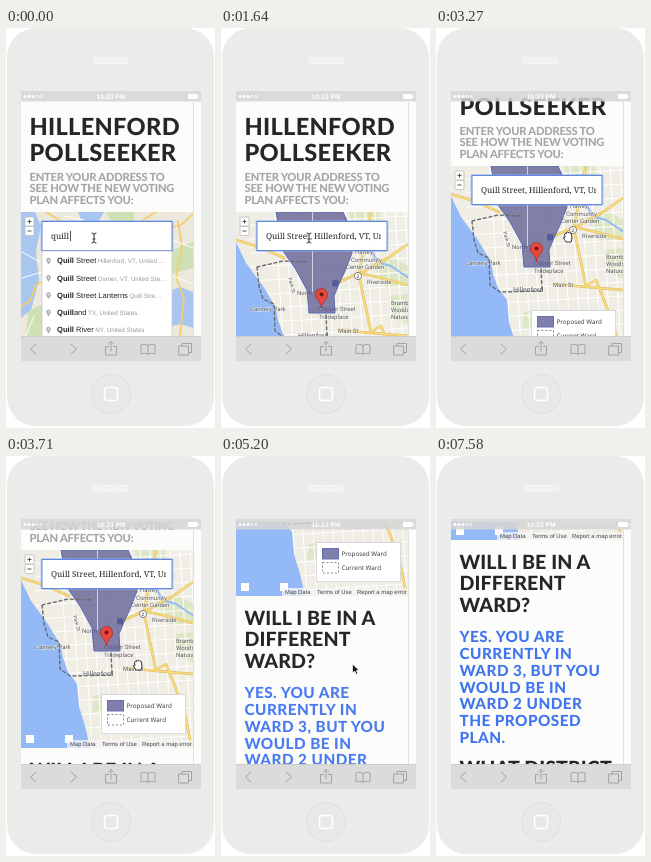
These frames come from a looping animation (209x400 px, 7810 ms). An HTML page:

```html
<!DOCTYPE html>
<html lang="en">
<head>
<meta charset="utf-8">
<title>Ward lookup on a phone</title>
<style>
html, body { margin: 0; width: 100%; height: 100%; overflow: hidden; background: #fff; }
svg { display: block; width: 100vw; height: 100vh; }
text { text-rendering: geometricPrecision; }
.head { font-family: Lato, "Open Sans", sans-serif; font-weight: 800; fill: #262626; }
.sub { font-family: Lato, "Open Sans", sans-serif; font-weight: 800; fill: #a6a6a6; }
.serif { font-family: "Noto Serif", Georgia, serif; font-size: 8.2px; fill: #222; }
.sans { font-family: "Liberation Sans", Arial, sans-serif; }
.map { font-family: Roboto, Arial, sans-serif; font-size: 6px; fill: #555; stroke: #fff; stroke-width: 1px; stroke-opacity: .7; paint-order: stroke; }
.line { fill: none; stroke-linecap: round; stroke-linejoin: round; }
</style>
</head>
<body>
<svg viewBox="0 0 209 400" preserveAspectRatio="none">
  <defs>
    <clipPath id="view"><rect x="15" y="66" width="172" height="242"/></clipPath>
    <clipPath id="mapBox"><rect x="15" y="184" width="172" height="198"/></clipPath>
    <clipPath id="field"><rect x="40" y="195" width="120" height="26"/></clipPath>
    <path id="roads" class="line" d="M15 212l26 8 22 10 M114 256l24-11 18 4 31 8 M119 302l32 3 36 3 M150 184l-6 30 -6 32 M150 304l10 -6 8 20 10 26 8 38 M138 248l12 56 M187 216l-20 14-29 16"/>
  </defs>

  <!-- phone -->
  <rect x="1" y="0" width="207" height="398" rx="29" fill="#ebebea"/>
  <path d="M88 30h34M86 32.500h38M88 35h34" stroke="#f7f7f7" stroke-width="1.800" stroke-dasharray="2.200 1"/>
  <circle cx="105" cy="366" r="19.500" fill="#e8e8e7" stroke="#dfdfde"/>
  <rect x="98.500" y="359.500" width="13" height="13" rx="3" fill="#e8e8e7" stroke="#fff" stroke-width="1.500"/>
  <rect x="15" y="63" width="180" height="270" fill="#fcfcfb"/>

  <g clip-path="url(#view)">
    <g id="page">
      <g id="copy"></g>
      <g clip-path="url(#mapBox)">
        <rect x="15" y="184" width="172" height="198" fill="#dcdcd6"/>
        <g id="wide">
          <rect x="15" y="184" width="172" height="124" fill="#ece9dc"/>
          <path d="M15 184h14l6 14-5 26 3 28-8 30-10 8z M166 262l8-3 13 5v36l-12-4-9 2z M72 184h26l-6 10h-16z" fill="#a9c6f0"/>
          <path d="M100 184h28v10h-22z M166 222l21-8v26l-21 6z M22 284l14-8v32H20z" fill="#cfe0b4"/>
          <path class="line" d="M15 278l9-5 6-16 7-4 M40 184l16 10 M134 194l16-10 M164 200l12-4 11-10 M172 193l4 26-6 30 8 22-4 37" stroke="#f2cf6b" stroke-width="1.800"/>
          <path class="line" d="M16 224l18 10 M16 250l20-6 M20 308l8-20 M166 212l21 8 M167 248l20 8 M58 188l20 4" stroke="#fff" stroke-width="1"/>
        </g>
        <g id="near">
          <rect x="15" y="184" width="172" height="198" fill="#f0ede4"/>
          <path d="M128 184h30l4 14-14 14-14-8z M150 236l20-8 17 10v20l-22 2z M168 268l19-2v30l-15-6z M88 330l10-2v16l-12 2z" fill="#dde7c6"/>
          <g id="streets" class="line" stroke="#fff" stroke-width="1"></g>
          <path d="M15 214l10 21 17 23 13 22 2 12 5 14 9 12 2 22 6 20 5 22H15z" fill="#93b9f7"/>
          <path d="M124 190l8 14 14 8 10 22 14 4 18 12" class="line" stroke="#93b9f7" stroke-width="2"/>
          <use href="#roads" stroke="#d9b65e" stroke-width="2.600"/>
          <use href="#roads" stroke="#fbdc78" stroke-width="1.700"/>
          <circle cx="137" cy="248" r="3.600" fill="#fff" stroke="#555" stroke-width=".7"/>
          <rect x="111" y="252" width="6.500" height="6.500" rx="2" fill="#4a62b8"/>
          <text class="sans" x="137" y="249.800" font-size="5" fill="#333" text-anchor="middle">2</text>
          <g id="labels"></g>
          <g id="ward">
            <path d="M55 184L62 223 74 240 86 262 88 285 114 285 113 268 118 256 124 243 131 225 130 202 122 184z" fill="#59588f" fill-opacity=".74" stroke="#5a6cb8" stroke-width="1"/>
            <path d="M91.500 184v80" stroke="#fff" stroke-opacity=".65" stroke-width="1"/>
            <path class="line" d="M36 239L62 233 86 234 M36 239L38 258 42 271 53 276 54 303 64 310 106 309 105 286" stroke="#6b6b70" stroke-width="1.400" stroke-dasharray="3 2.800"/>
            <path d="M100.500 280C100 273 94.500 272 94.500 266.500a6 6 0 0 1 12 0C106.500 272 101 273 100.500 280z" fill="#e8473d" stroke="#a52a24" stroke-width=".7"/>
            <circle cx="100.500" cy="266.500" r="2" fill="#6d1713"/>
          </g>
          <rect x="95.500" y="328.500" width="84" height="39" fill="#fff" stroke="#d8d8d8"/>
          <rect x="101.500" y="334.500" width="16" height="10.500" fill="#7f7eac" stroke="#6570ad"/>
          <rect x="101.500" y="348.500" width="16" height="10.500" fill="#fff" stroke="#888" stroke-dasharray="2 2"/>
          <g font-family="Open Sans, sans-serif" font-size="6.300" fill="#333"><text x="120.500" y="341.500">Proposed Ward</text><text x="120.500" y="356">Current Ward</text></g>
          <rect x="20" y="369" width="8" height="8" fill="#fff"/>
          <rect x="59" y="369" width="8" height="8" fill="#fff"/>
          <rect x="61" y="374" width="126" height="8" fill="#f5f5f5" fill-opacity=".78"/>
          <g class="sans" font-size="5.900" fill="#444"><text x="64" y="380.300">Map Data</text><text x="96" y="380.300">Terms of Use</text><text x="136" y="380.300">Report a map error</text></g>
        </g>
        <rect id="blank" x="101" y="184" width="86" height="124" fill="#dcdcd6"/>
        <g fill="#fff" stroke="#bbb" stroke-width=".8"><rect x="19" y="189" width="9" height="9" rx="1"/><rect x="19" y="198.500" width="9" height="9" rx="1"/></g>
        <path d="M21.500 193.500h4m-2-2v4M21.500 203h4" stroke="#555" stroke-width="1"/>
      </g>
      <rect x="35.500" y="193" width="131" height="30" rx="1" fill="none" stroke="#8db0f0" stroke-opacity=".5" stroke-width="2"/>
      <rect x="36" y="193.500" width="130" height="29" fill="#fff" stroke="#5d86dc"/>
      <g clip-path="url(#field)"><text id="query" class="serif" x="45" y="211"></text></g>
      <path id="caret" d="M64.500 203v10" stroke="#222" stroke-width=".8"/>
      <g id="menu"></g>
    </g>
  </g>

  <path d="M187.500 74v234" stroke="#e0e0e0"/>

  <!-- status bar and toolbar -->
  <rect x="15" y="63" width="180" height="10.500" fill="#d6d6d5" fill-opacity=".86"/>
  <g fill="#fff"><circle cx="19" cy="68.500" r="1.500"/><circle cx="23" cy="68.500" r="1.500"/><circle cx="27" cy="68.500" r="1.500"/></g>
  <g fill="none" stroke="#fff" stroke-width=".7"><circle cx="31" cy="68.500" r="1.200"/><circle cx="35" cy="68.500" r="1.200"/></g>
  <text class="sans" x="105" y="71" font-size="6.700" font-weight="700" text-anchor="middle" fill="#fff">10:23 PM</text>
  <rect x="182" y="66" width="9.500" height="5" rx="1" fill="#fff"/><rect x="192" y="67.500" width="1" height="2" fill="#fff"/>
  <rect x="15" y="308" width="180" height="25" fill="#dbdbda"/>
  <path d="M15 308.500h180" stroke="#cdcdcc"/>
  <g class="line" stroke="#a3a3a2" stroke-width="1">
    <path d="M30 316l-5.500 5 5.500 5M65 316l5.500 5-5.500 5"/>
    <path d="M102.500 318.500h-3v8.500h11v-8.500h-3M105 323v-9.500m-2.500 2.500l2.500-2.500 2.500 2.500"/>
    <path d="M142 317.500c-2-1.500-5-1.500-7-.5v9c2-1 5-1 7 .5 2-1.500 5-1.500 7-.5v-9c-2-1-5-1-7 .5zm0 0v9"/>
    <path d="M173 318h9.500v9H173zM176 318v-2.500h9.500v9h-3"/>
  </g>

  <g id="pointer">
    <g id="beam" class="line"><path d="M-2-5q2 0 2 1.500v7q0 1.500 2 1.500M2-5q-2 0-2 1.500M0 3.500q0 1.500-2 1.500M-1 1h2" stroke="#fff" stroke-width="2"/><path d="M-2-5q2 0 2 1.500v7q0 1.500 2 1.500M2-5q-2 0-2 1.500M0 3.500q0 1.500-2 1.500M-1 1h2" stroke="#222" stroke-width=".9"/></g>
    <path id="hand" d="M-2 5L-4.500 1q0-1.500 1.500-.5L-3.500-3q.8-1.500 1.700 0L-1.500-4.500q1-1 1.600.2Q1-5.300 1.800-3.800 3-4.500 3.400-3L4 1 3 5z" fill="#fff" stroke="#222" stroke-width=".9" stroke-linejoin="round"/>
    <path id="arrow" d="M-2-5v9l2.200-2 1.500 3.300 1.600-.7-1.500-3.200h2.800z" fill="#111" stroke="#fff" stroke-width=".7"/>
  </g>
</svg>
<script>
const $ = id => document.getElementById(id);
const el = (parent, tag, attrs, text) => {
  const node = document.createElementNS('http://www.w3.org/2000/svg', tag);
  for (const k in attrs) node.setAttribute(k, attrs[k]);
  if (text) node.textContent = text;
  return parent.appendChild(node);
};
const show = (id, on) => { $(id).style.display = on ? '' : 'none'; };

// Page text: first baseline, line step, size
function block(cls, y, step, size, lines, spacing = 0) {
  const g = el($('copy'), 'g', { class: cls, 'font-size': size, 'letter-spacing': spacing });
  lines.forEach((s, i) => el(g, 'text', { x: 23.5, y: y + i * step }, s));
  return g;
}
block('head', 106.5, 26, 23.6, ['HILLENFORD', 'POLLSEEKER'], .3);
block('sub', 153, 11.3, 11.2, ['ENTER YOUR ADDRESS TO', 'SEE HOW THE NEW VOTING', 'PLAN AFFECTS YOU:'], -.25);
block('head', 411, 21.4, 19.6, ['WILL I BE IN A', 'DIFFERENT', 'WARD?'], .1);
const answer = block('head', 484, 16.85, 15.3, ['YES. YOU ARE', 'CURRENTLY IN', 'WARD 3, BUT YOU',
  'WOULD BE IN', 'WARD 2 UNDER', 'THE PROPOSED', 'PLAN.'], .45);
block('head', 616.5, 21, 19.6, ['WHAT DISTRICT'], .1);

// Street grid, slightly tilted
for (let i = 0; i < 14; i++) {
  const x = 54 + i * 10, y = 192 + i * 14;
  el($('streets'), 'path', { d: `M${x} 184L${x + 12} 382M30 ${y + 5}L187 ${y - 4}` });
}

[[29, 283, 'Cannery Park'], [77, 309.5, 'Hillenford', 7], [98, 283, 'Copper Street'], [98, 291, 'Tradeplace'],
 [117, 305, 'Main St'], [76, 267, 'North St'], [134, 226, 'Halvey'], [130, 233.5, 'Community'],
 [125, 241, 'Center Garden'], [146, 256, 'Riverside'], [170, 277, 'Bramble'],
 [170, 284, 'Woods'], [170, 291, 'Natural']
].forEach(([x, y, s, size = 6]) => el($('labels'), 'text', { class: 'map', x, y, style: `font-size:${size}px` }, s));
el($('labels'), 'text', { class: 'map', transform: 'translate(67 250) rotate(75)', style: 'font-size:5px' }, 'Park St');

// Suggestions
const menu = $('menu');
el(menu, 'rect', { x: 36, y: 223, width: 130, height: 92, fill: '#fff', stroke: '#ccc', 'stroke-width': .8 });
const hover = el(menu, 'rect', { x: 36.5, y: 224, width: 129, height: 17.5, fill: '#ebebeb' });
[['Quill', ' Street', 'Hillenford, VT, United …'], ['Quill', ' Street', 'Osmer, VT, United Sta…'],
 ['Quill', ' Street Lanterns', 'Quill Stre…'], ['Quill', 'and', 'TX, United States'],
 ['Quill', ' River', 'NY, United States']
].forEach(([match, rest, place], i) => {
  const y = 235.3 + i * 17.25;
  el(menu, 'path', { d: `M42.500 ${y + 1.5}l-2-3.500a2.300 2.300 0 1 1 4 0z`, fill: '#b0b0b0' });
  el(menu, 'circle', { cx: 42.5, cy: y - 3, r: .8, fill: '#fff' });
  const t = el(menu, 'text', { class: 'sans', x: 51, y, 'font-size': 7.6, fill: '#222' });
  el(t, 'tspan', { 'font-weight': 700 }, match);
  el(t, 'tspan', {}, rest);
  el(t, 'tspan', { 'font-size': 6.3, fill: '#999', dx: 1.5 }, place);
});

const LOOP = 7810;
// time, scroll, pointer x, pointer y, pointer shape
const steps = [
  [0, 0, 88, 210, 'beam'],
  [2230, 0, 98, 210, 'beam'], [2380, 0, 113, 211, 'beam'], [2530, 0, 126, 211, 'beam'], [2670, 0, 131, 211, 'beam'],
  [2970, 8, 132, 210, 'beam'], [3120, 25, 132, 209, 'hand'], [3270, 46, 132, 209, 'hand'],
  [3420, 66, 132, 209, 'hand'], [3560, 82, 132, 209, 'hand'], [3710, 90, 132, 209, 'hand'],
  [4600, 104, 132, 209, 'hand'], [4750, 134, 132, 210, 'hand'], [4900, 172, 133, 211, 'hand'],
  [5050, 208, 133, 213, 'arrow'], [5200, 242, 133.5, 213, 'arrow'], [5350, 270, 133, 212, 'arrow'],
  [5490, 288, 132, 210, 'arrow'], [5640, 298, 131, 209, 'arrow'], [5790, 298, 131, 209, 'beam'],
  [6990, 298, 139, 222, 'beam'], [7140, 298, 157, 258, 'beam'], [7290, 298, 182, 316, 'arrow'],
  [7430, 298, 203, 370, 'arrow'], [7580, 298, 0, 0, 'none']
];

function draw(now) {
  const t = now % LOOP;
  const [, scroll, x, y, shape] = steps.findLast(s => s[0] <= t);
  $('page').setAttribute('transform', `translate(0 ${-scroll})`);
  $('pointer').setAttribute('transform', `translate(${x} ${y})`);
  ['beam', 'hand', 'arrow'].forEach(s => show(s, s === shape));
  $('query').textContent = t < 450 ? 'quill' : 'Quill Street, Hillenford, VT, United States';
  show('caret', t < 450);
  show('menu', t < 1200);
  hover.style.display = t >= 450 ? '' : 'none';
  show('wide', t < 1200);
  show('near', t >= 1350);
  show('blank', t >= 1350 && t < 1490);
  show('ward', t >= 1640);
  answer.style.fill = t < 5790 ? '#4a7cf0' : t < 6990 ? '#2456e0' : '#4075ee';
}
function tick() {
  draw(performance.now());
  requestAnimationFrame(tick);
}
tick();
</script>
</body>
</html>
```
